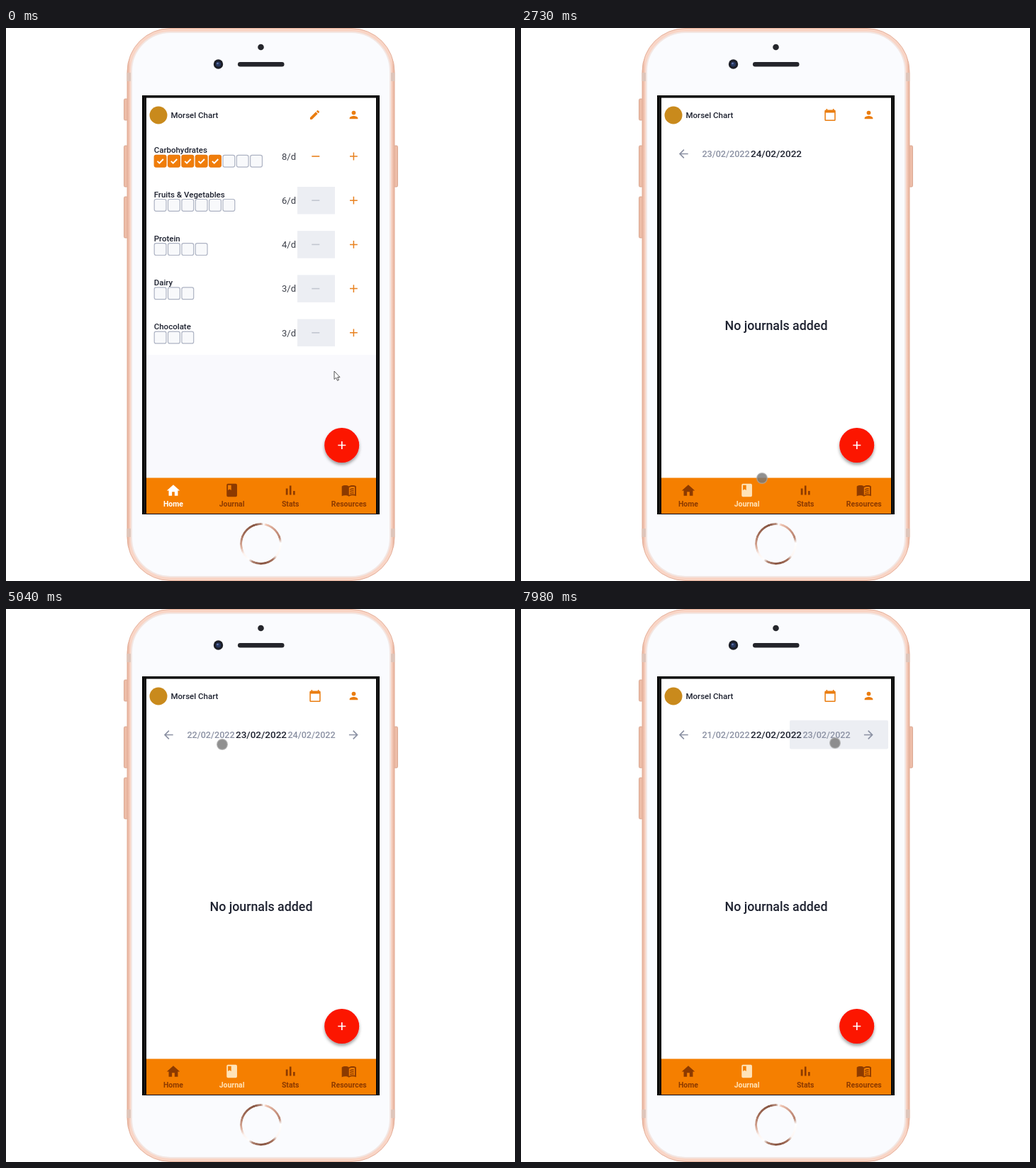
Write an HTML page that moves like this. It is 718 px wide and 780 px high and loops after 8000 ms.

```html
<!DOCTYPE html>
<html lang="en">
<head>
<meta charset="utf-8">
<title>Portion tracker demo</title>
<style>
  html, body { margin: 0; width: 100%; height: 100%; overflow: hidden; background: #fff; }
  svg { position: absolute; left: 0; top: 0; display: block; }
  text { font-family: Roboto, sans-serif; font-weight: 500; fill: #1e2230; }
  #homeButton {
    position: absolute; left: 330px; top: 698px; width: 59px; height: 59px; border-radius: 50%;
    background: conic-gradient(#b88d7d 0deg, #fff 8deg, #eec3b1 16deg, #c99380 50deg, #b98572 72deg,
      #fff 88deg, #fdf6f3 128deg, #a87460 142deg, #865340 175deg, #b08371 205deg, #fff 217deg,
      #fdf3ef 240deg, #d9aa97 262deg, #a06b57 300deg, #865542 340deg, #b88d7d 360deg);
    -webkit-mask: radial-gradient(circle, transparent 26px, #000 26.7px);
    mask: radial-gradient(circle, transparent 26px, #000 26.7px);
  }
  .label { font-size: 11.5px; }
  .rate { font-size: 13px; font-weight: 400; fill: #3d404a; }
  .side { font-size: 12.6px; fill: #8b91a3; }
  .middle { text-anchor: middle; }
  .tab text { font-size: 10.5px; font-weight: 700; fill: inherit; }
</style>
</head>
<body>
<svg width="718" height="780" viewBox="0 0 718 780">
  <defs>
    <filter id="shadow" x="-30%" y="-30%" width="160%" height="170%">
      <feDropShadow dx="0" dy="3" stdDeviation="2" flood-color="#000" flood-opacity=".38"/>
    </filter>
    <linearGradient id="rim">
      <stop offset="0" stop-color="#e5ae97"/><stop offset=".012" stop-color="#f9d5c6"/>
      <stop offset=".988" stop-color="#f9d5c6"/><stop offset="1" stop-color="#e5ae97"/>
    </linearGradient>
  </defs>

  <!-- Phone body -->
  <g fill="#edbda8" stroke="#d39c85" stroke-width=".8">
    <rect x="166.500" y="100" width="6" height="30" rx="1.500"/>
    <rect x="166.500" y="166" width="6" height="58" rx="1.500"/>
    <rect x="166.500" y="238" width="6" height="58" rx="1.500"/>
    <rect x="546.500" y="166" width="6" height="58" rx="1.500"/>
  </g>
  <rect x="171" y=".5" width="377" height="779" rx="61" fill="url(#rim)" stroke="#e4b09b"/>
  <path d="M170.500 63h7v12h-7zM541.500 63h7v12h-7zM170.500 706h7v12h-7zM541.500 706h7v12h-7z" fill="#dfc5ba"/>
  <rect x="177" y="6" width="365" height="768" rx="55" fill="#fafbfe" stroke="#f3e6e2" stroke-width="2"/>
  <circle cx="359.500" cy="27" r="4.300" fill="#25262c"/>
  <circle cx="299.500" cy="51" r="6.700" fill="#1c1e27"/>
  <circle cx="299.500" cy="51" r="3.500" fill="#27375f"/>
  <circle cx="298.500" cy="50" r="1.300" fill="#6478ad"/>
  <rect x="327" y="48" width="65.500" height="6.500" rx="3.200" fill="#24252b"/>
  <rect x="192" y="95" width="335" height="591" fill="#050505"/>
  <path d="M195.500 98V685M524.500 98V685" stroke="#2c2c2c" stroke-width=".8"/>
  <rect x="198" y="98.500" width="324" height="586" fill="#fff"/>

  <!-- App header -->
  <circle cx="215" cy="123" r="12.500" fill="#c98a1c"/>
  <text class="label" x="232.500" y="127">Morsel Chart</text>
  <g id="header" fill="#ea7d10"></g>

  <g id="homeView">
    <rect x="198" y="461" width="324" height="174" fill="#f9f9fd"/>
    <g id="rows"></g>
  </g>

  <g id="journalView">
    <rect id="highlight" y="157" width="139" height="40.500" rx="2" fill="#eceef3"/>
    <g id="arrows" fill="#8b91a3"></g>
    <g class="middle">
      <text id="previous" class="side" x="289" y="182"></text>
      <text id="current" x="360" y="182" font-size="13.500"></text>
      <text id="next" class="side" x="431" y="182"></text>
      <text x="360" y="426" font-size="17.800">No journals added</text>
    </g>
  </g>

  <circle cx="473.700" cy="588.500" r="24.500" fill="#fc1200" filter="url(#shadow)"/>
  <path d="M468.300 588.500h11M473.800 583v11" stroke="#fff" stroke-width="1.700"/>
  <rect x="198" y="634.500" width="324" height="50.500" fill="#f57f00"/>
  <g id="tabs"></g>

  <path id="arrowCursor" d="M0 0V11.500L2.700 9.200 4.500 13.300 6.400 12.500 4.700 8.500H8Z" fill="#fff" stroke="#444" stroke-width=".9"/>
  <circle id="touchCursor" r="7.300" fill="#777" fill-opacity=".82" stroke="#aaa" stroke-opacity=".75" stroke-width="1.400"/>
</svg>
<div id="homeButton"></div>

<script>
const $ = id => document.getElementById(id);

const icons = {
  pencil: 'M3 17.250V21h3.750L17.810 9.940l-3.750-3.750zM20.710 7.040a1 1 0 0 0 0-1.410l-2.340-2.340a1 1 0 0 0-1.410 0l-1.830 1.830 3.750 3.750z',
  person: 'M12 12a4 4 0 1 0 0-8 4 4 0 0 0 0 8zm0 2c-2.670 0-8 1.340-8 4v2h16v-2c0-2.660-5.330-4-8-4z',
  calendar: 'M20 3h-1V1h-2v2H7V1H5v2H4a2 2 0 0 0-2 2v16a2 2 0 0 0 2 2h16a2 2 0 0 0 2-2V5a2 2 0 0 0-2-2zm0 18H4V8h16z',
  back: 'M20 11H7.830l5.590-5.590L12 4l-8 8 8 8 1.410-1.410L7.830 13H20z',
  forward: 'M4 11h12.170l-5.590-5.590L12 4l8 8-8 8-1.410-1.410L16.170 13H4z',
  home: 'M10 20.500v-6h4v6h5v-8h3l-10-9-10 9h3v8z',
  journal: 'M18 2H6a2 2 0 0 0-2 2v16a2 2 0 0 0 2 2h12a2 2 0 0 0 2-2V4a2 2 0 0 0-2-2zM6 4h5v8l-2.500-1.500L6 12z',
  stats: 'M5 9.200h3V19H5zM10.600 5h2.800v14h-2.800zm5.600 8H19v6h-2.800z',
  resources: 'M12 6C9 4 4 4 1 6v15c3-1.500 8-1.500 11 .5 3-2 8-2 11-.5V6c-3-2-8-2-11 0zm9 12.500c-3-.9-6.500-.4-9 1V8c2.500-1.500 6-2 9-1zM13.500 10.200q3-1.500 6-.9v1.500q-3-.6-6 .9zm0 3q3-1.500 6-.9v1.500q-3-.6-6 .9zm0 3q3-1.500 6-.9v1.500q-3-.6-6 .9z'
};

const icon = (name, x, y, scale, id = '') =>
  `<path id="${id}" fill-rule="evenodd" d="${icons[name]}" transform="translate(${x} ${y}) scale(${scale}) translate(-12 -12)"/>`;

const checkbox = (x, y, checked) =>
  `<rect x="${x}" y="${y}" width="16.800" height="16.800" rx="2.500" stroke-width="1.200"
    fill="${checked ? '#f07d0a' : '#f8f9fb'}" stroke="${checked ? '#e9790c' : '#adb3c3'}"/>` +
  (checked ? `<path d="M${x + 4.3} ${y + 8.5}l2.900 2.900 5.500-5.700" fill="none" stroke="#fff" stroke-width="1.900"/>` : '');

const row = ([name, total, done], index) => {
  const y = 181 + index * 62.2;
  const boxes = Array.from({ length: total }, (_, i) => checkbox(209.2 + i * 19.35, y - 1.7, i < done)).join('');
  const disabled = done ? '' : `<rect x="411" y="${y - 19.2}" width="53" height="38.500" fill="#eceef3"/>`;
  return `<text class="label" x="208.700" y="${y - 4.7}">${name}</text>${boxes}
    <text class="rate" x="389" y="${y + 4.7}">${total}/d</text>${disabled}
    <path d="M431.300 ${y}h11" stroke="${done ? '#e8811f' : '#c2c6d0'}" stroke-width="1.600"/>
    <path d="M485 ${y}h10.800M490.400 ${y - 5.4}v10.800" stroke="#e8811f" stroke-width="1.500"/>`;
};

$('rows').innerHTML = [
  ['Carbohydrates', 8, 5], ['Fruits &amp; Vegetables', 6, 0], ['Protein', 4, 0], ['Dairy', 3, 0], ['Chocolate', 3, 0]
].map(row).join('');

$('header').innerHTML = icon('pencil', 435.5, 122.5, 0.73, 'pencil') +
  icon('calendar', 436, 122.5, 0.77, 'calendar') + icon('person', 490.5, 122.5, 0.73);
$('arrows').innerHTML = icon('back', 229.3, 177.5, 0.8) + icon('forward', 490.3, 177.5, 0.8, 'forward');
$('tabs').innerHTML = ['Home', 'Journal', 'Stats', 'Resources'].map((name, i) => {
  const x = 236 + i * 82.6;
  return `<g class="tab">${icon(name.toLowerCase(), x, 652, 0.92)}<text class="middle" x="${x}" y="675">${name}</text></g>`;
}).join('');

const duration = 8000;
const touchStart = 900;
const journalStart = 2300;
const pressLength = 230;
// Time, x, y
const path = [
  [0, 466, 490], [touchStart, 466, 490], [1740, 354, 632], [2080, 321, 653], [2400, 321, 653],
  [2730, 340, 635], [2900, 340, 635], [3930, 331, 207], [4400, 305, 191], [5950, 305, 191],
  [6550, 443, 189], [duration, 443, 189]
];
// Time, change in days
const clicks = [[4600, -1], [5200, -1], [5520, -1], [5840, -1], [7150, 1], [7850, 1]];

function pointerAt(time) {
  const i = path.findIndex(point => point[0] > time);
  const [t0, x0, y0] = path[i - 1];
  const [t1, x1, y1] = path[i];
  const p = (time - t0) / (t1 - t0);
  const eased = p * p * (3 - 2 * p);
  return [x0 + (x1 - x0) * eased, y0 + (y1 - y0) * eased];
}

const show = (id, visible) => $(id).setAttribute('display', visible ? 'inline' : 'none');
const dateText = day => `${day}/02/2022`;

function render(time) {
  const journal = time >= journalStart;
  show('homeView', !journal);
  show('journalView', journal);
  show('pencil', !journal);
  show('calendar', journal);
  document.querySelectorAll('.tab').forEach((tab, i) => {
    const active = i === Number(journal);
    tab.setAttribute('fill', !active ? '#8c3a00' : journal ? '#ffe3b8' : '#fff');
  });

  const past = clicks.filter(click => click[0] <= time);
  const day = past.reduce((sum, click) => sum + click[1], 24);
  $('previous').textContent = dateText(day - 1);
  $('current').textContent = dateText(day);
  $('next').textContent = dateText(day + 1);
  show('next', day < 24);
  show('forward', day < 24);

  const last = past.at(-1);
  show('highlight', last && time - last[0] < pressLength);
  if (last) $('highlight').setAttribute('x', last[1] < 0 ? 202 : 379);

  const [x, y] = pointerAt(time);
  const touch = time >= touchStart;
  show('arrowCursor', !touch);
  show('touchCursor', touch);
  $('arrowCursor').setAttribute('transform', `translate(${x - 3} ${y - 6})`);
  $('touchCursor').setAttribute('transform', `translate(${x} ${y})`);
}

const start = performance.now();
function tick() {
  render((performance.now() - start) % duration);
  requestAnimationFrame(tick);
}
tick();
</script>
</body>
</html>
```
